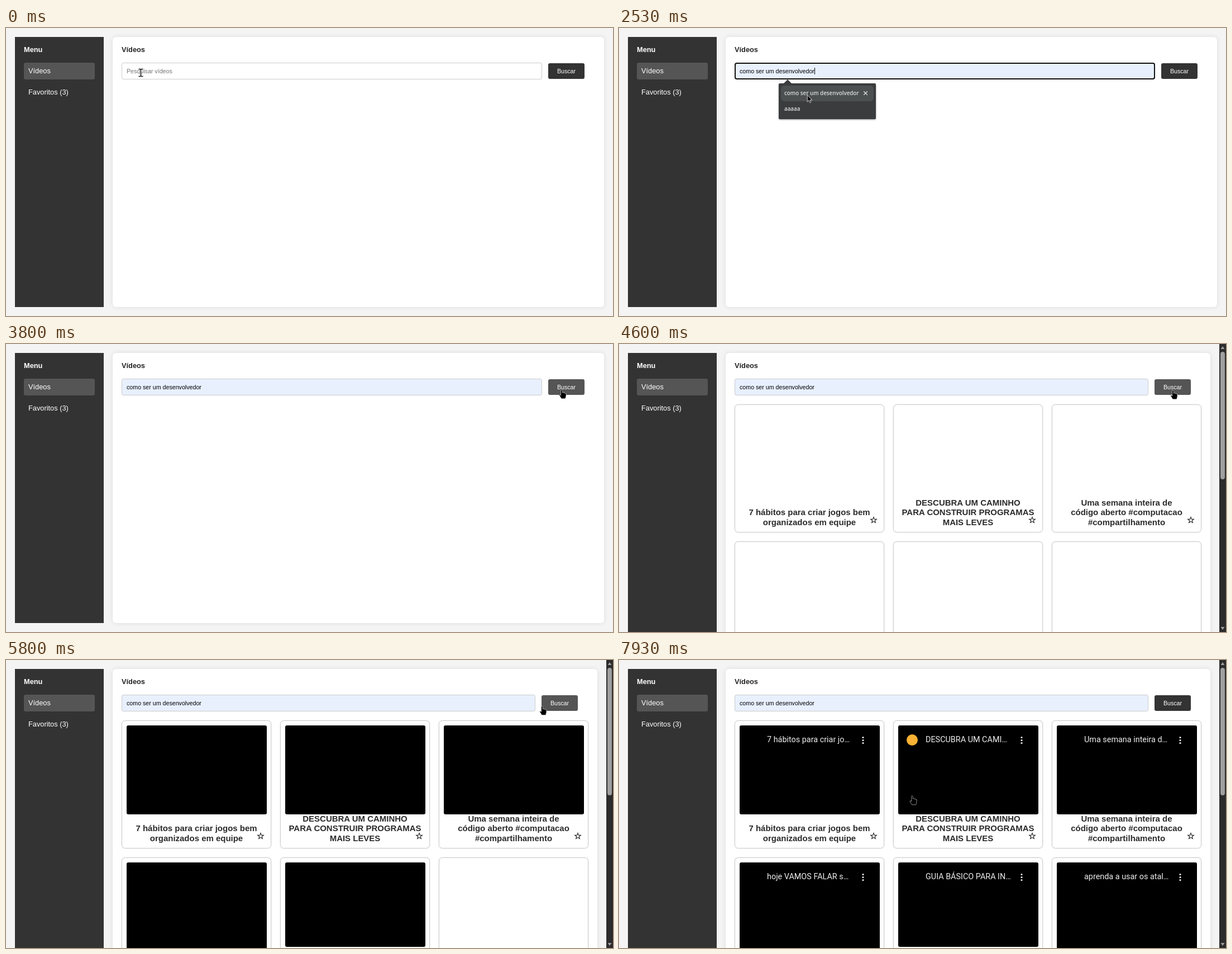
An HTML page for the animation above (8 s loop, 1087x515 px).

```html
<!DOCTYPE html>
<html lang="pt">
<head>
<meta charset="utf-8">
<title>Vídeos</title>
<style>
html, body { margin: 0; width: 100%; height: 100%; overflow: hidden; }
#stage { position: relative; width: 1087px; height: 515px; overflow: hidden; background: #f4f4f4;
  font: 12.8px/16px "Liberation Sans", Arial, sans-serif; color: #222; }
#stage * { box-sizing: border-box; }
#stage div, #stage svg { position: absolute; }
.label { white-space: nowrap; }
#side { left: 16px; top: 16px; width: 159px; height: 483px; background: #333; color: #fff; }
#side .active { left: 16px; top: 46px; width: 127px; height: 30px; border-radius: 3.2px; background: #555; }
#main { left: 191px; top: 16px; width: 880px; height: 483px; border-radius: 6.4px; background: #fff;
  box-shadow: 0 0 8px rgba(0,0,0,.1); }
#field { left: 207px; top: 62px; width: 753px; height: 29.5px; border: 1px solid #ccc; border-radius: 3.2px;
  background: #fff; display: flex; align-items: center; padding-left: 8px; font-size: 10.67px; color: #000; white-space: pre; }
#field::after { content: ""; position: absolute; inset: -1px; border-radius: 4px; }
#caret { width: 1px; height: 12px; background: #000; order: -1; margin-right: -1px; visibility: hidden; }
#hint { color: #757575; }
#query { display: none; }
#button { left: 971px; top: 63px; width: 65px; height: 28px; border-radius: 3.2px; background: #333; color: #fff;
  font-size: 10.67px; line-height: 28px; text-align: center; }
#button.over { background: #555; }

.focus #field::after { border: 2px solid #101010; }
.filled #field { background: #e8f0fe; }
.filled #hint { display: none; }
.filled #query { display: inline; }
.filled #caret { order: 1; }

#popup { left: 286px; top: 98.5px; width: 174px; height: 64px; border-radius: 2px; background: #1a1e1f; color: #f0f0f0;
  font: 600 9.8px/16px "Open Sans", "Noto Sans", sans-serif; box-shadow: 0 1px 3px rgba(0,0,0,.4); }
#popup::before { content: ""; position: absolute; left: 9px; top: -6.5px; border: solid transparent;
  border-width: 0 7px 7px; border-bottom-color: #1a1e1f; }
#popup .row { left: 4px; top: 4px; width: 166px; height: 28px; border-radius: 6px; }
#popup .label { left: 9px; }
#popup svg { left: 152px; top: 14.5px; opacity: 0; }
.picked #popup { background: #3a3c3d; color: #dcdedf; }
.picked #popup::before { border-bottom-color: #3a3c3d; }
.picked #popup .row { background: #4d5051; }
.picked #popup .label { left: 10px; }
.picked #popup svg { opacity: 1; }

.results #side { height: 520px; }
.results #main { width: 868px; height: 520px; }
.results #field { width: 741px; }
.results #button { left: 959px; }
#list { inset: 0; }
.card { width: 268px; height: 229px; border: 1px solid #ccc; border-radius: 6.4px; background: #fff;
  box-shadow: 0 0 3px rgba(0,0,0,.1); }
.card h3 { position: absolute; left: 0; right: 0; bottom: 8.5px; margin: 0; text-align: center; white-space: nowrap;
  font: bold 14.98px/17.5px "Liberation Sans", Arial, sans-serif; color: #2b2b2b; }
.player { left: 8px; top: 8px; width: 250.5px; height: 159.5px; border-radius: 3px; background: #000; }
.bar { inset: 0; }
.name { left: 49px; top: 16px; width: 154px; overflow: hidden; text-overflow: ellipsis; white-space: nowrap;
  font: 14.4px/20px Roboto, sans-serif; color: #eee; }
.dots { left: 219px; top: 19px; }
.star { left: 241px; top: 199px; }
#badge { left: 15px; top: 16px; width: 20px; height: 20px; border-radius: 50%; background: #f9b233; }
#scroll { left: 1075px; top: 0; width: 12px; height: 515px; background: #2c2c2c; }
#scroll .thumb { left: 2px; top: 14px; width: 8px; height: 228px; border-radius: 4px; background: #9f9f9f; }
#cursor { left: 0; top: 0; overflow: visible; }
</style>
</head>
<body>
<div id="stage">
  <div id="side">
    <div class="label" style="left:16px;top:14.5px"><b>Menu</b></div>
    <div class="active"></div>
    <div class="label" style="left:24px;top:53px">Vídeos</div>
    <div class="label" style="left:24px;top:91px">Favoritos (3)</div>
  </div>
  <div id="main"><div class="label" style="left:16px;top:14.5px"><b>Vídeos</b></div></div>
  <div id="field"><span id="hint">Pesquisar vídeos</span><span id="query">como ser um desenvolvedor</span><span id="caret"></span></div>
  <div id="button">Buscar</div>
  <div id="list"></div>
  <div id="popup">
    <div class="row"></div>
    <div class="label" style="top:10px">como ser um desenvolvedor</div>
    <div class="label" style="top:38.5px">aaaaa</div>
    <svg width="7" height="7"><path d="M0 0L7 7M7 0L0 7" stroke="#dcdedf" stroke-width="1.3"/></svg>
  </div>
  <div id="scroll">
    <div class="thumb"></div>
    <svg width="12" height="515" fill="#9f9f9f"><path d="M6 4L9.5 9H2.5ZM6 511L9.5 506H2.5Z"/></svg>
  </div>
  <svg id="cursor" width="1" height="1">
    <path id="beam" d="M-4 -6.5H-1.2L0 -5.5L1.2 -6.5H4M0 -5.5V5.5M-4 6.5H-1.2L0 5.5L1.2 6.5H4" fill="none" stroke="#111" stroke-width="1.5"/>
    <path id="arrow" d="M0 0V12L2.8 9.4L4.6 13.6L6.6 12.8L4.8 8.7H8.6Z" fill="#000" stroke="#fff" stroke-width=".8"/>
    <path id="hand" d="M-1.3 .8Q0 -1 1.3 .8V5L3 4.8L4.3 5.5L5.8 5.4L6.8 6.4L8 6.6V11L6.6 15.8H-.4L-4.2 9.6Q-3.6 8 -1.3 9.8Z" fill="#000" stroke="#fff" stroke-width=".8" stroke-dasharray="1.4 .7"/>
  </svg>
</div>
<script>
const LOOP = 8000, STEP = 1000 / 15;
const $ = id => document.getElementById(id);
const stage = $("stage");

// heading lines, time the player turns black, time its title bar appears
const videos = [
  { lines: ["7 hábitos para criar jogos bem", "organizados em equipe"], black: 5600, bar: 7270 },
  { lines: ["DESCUBRA UM CAMINHO", "PARA CONSTRUIR PROGRAMAS", "MAIS LEVES"], black: 5670, bar: 6730 },
  { lines: ["Uma semana inteira de", "código aberto #computacao", "#compartilhamento"], black: 5730, bar: 7330 },
  { lines: ["hoje VAMOS FALAR sobre lógica"], black: 5530, bar: 7470 },
  { lines: ["GUIA BÁSICO PARA INICIANTES"], black: 5800, bar: 7600 },
  { lines: ["aprenda a usar os atalhos do teclado"], black: 5870, bar: 7730 }
];

function starPath() {
  const points = [];
  for (let i = 0; i < 10; i++) {
    const r = i % 2 ? 2.3 : 5.6, a = i * Math.PI / 5 - Math.PI / 2;
    points.push((7 + r * Math.cos(a)).toFixed(2) + " " + (7 + r * Math.sin(a)).toFixed(2));
  }
  return "M" + points.join("L") + "Z";
}

videos.forEach((v, i) => {
  const card = document.createElement("div");
  card.className = "card";
  card.style.left = 207 + 284 * (i % 3) + "px";
  card.style.top = 107.5 + 245 * Math.floor(i / 3) + "px";
  card.innerHTML = `<h3>${v.lines.join("<br>")}</h3>
    <svg class="star" width="14" height="14"><path d="${starPath()}" fill="none" stroke="#222" stroke-width="1.1"/></svg>
    <div class="player"><div class="bar"><div class="name">${v.lines.join(" ")}</div>
    <svg class="dots" width="4" height="16" fill="#eee"><circle cx="2" cy="2.5" r="1.6"/><circle cx="2" cy="7.5" r="1.6"/><circle cx="2" cy="12.5" r="1.6"/></svg></div></div>`;
  $("list").append(card);
  v.player = card.querySelector(".player");
  v.barBox = card.querySelector(".bar");
});
videos[4].player.style.height = "151.5px";
const badge = document.createElement("div");
badge.id = "badge";
videos[1].player.append(badge);

// pointer hot spot: time, x, y
const path = [
  [2000, 241.5, 80], [2200, 285, 96], [2400, 325, 115], [2530, 337, 120], [2800, 346, 119],
  [2870, 358, 119], [3100, 560, 112], [3400, 890, 94], [3600, 995, 82], [4466, 995, 82],
  [4530, 992, 83], [5466, 992, 83], [5530, 990, 84], [5930, 946, 82], [6330, 946, 80],
  [6530, 890, 72], [6800, 810, 90], [7130, 690, 133], [7200, 668, 142], [7600, 570, 210], [7930, 525, 243]
];

function pointerAt(t) {
  const i = path.findIndex(p => p[0] > t);
  if (i === 0) return path[0].slice(1);
  if (i < 0) return path[path.length - 1].slice(1);
  const a = path[i - 1], b = path[i], k = (t - a[0]) / (b[0] - a[0]);
  return [a[1] + (b[1] - a[1]) * k, a[2] + (b[2] - a[2]) * k];
}

const show = (el, on) => { el.style.visibility = on ? "inherit" : "hidden"; };
const inside = (x, y, l, t, r, b) => x >= l && x <= r && y >= t && y <= b;

function draw(now) {
  const t = Math.floor((now % LOOP + 3.4) / STEP) * STEP + 4;
  const [x, y] = pointerAt(t);
  const results = t >= 4530, shift = results ? 12 : 0;
  const focus = t >= 1200 && t < 3800;
  const popup = t >= 1270 && t < 2800;
  const picked = popup && inside(x, y, 286, 98.5, 460, 131);
  const onField = inside(x, y, 207, 62, 960 - shift, 91.5);
  const onButton = inside(x, y, 971 - shift, 63, 1036 - shift, 91);
  const onPlayer = t >= 5930 && inside(x, y, 500, 116, 750, 275);

  stage.classList.toggle("results", results);
  stage.classList.toggle("focus", focus);
  stage.classList.toggle("picked", picked);
  stage.classList.toggle("filled", picked || t >= 2800);
  $("button").classList.toggle("over", onButton);
  show($("popup"), popup);
  show($("list"), results);
  show($("scroll"), results);
  show($("caret"), focus && (t < 1730 || t >= 2260 && t < 3330));
  for (const v of videos) {
    show(v.player, t >= v.black);
    show(v.barBox, t >= v.bar);
  }
  show(badge, t >= 7400);

  const hand = onButton || onPlayer;
  show($("beam"), onField);
  show($("hand"), hand);
  show($("arrow"), !onField && !hand);
  $("cursor").style.transform = `translate(${x}px, ${y}px)`;
}

const start = performance.now();
function tick() {
  draw(performance.now() - start);
  requestAnimationFrame(tick);
}
tick();
</script>
</body>
</html>
```
